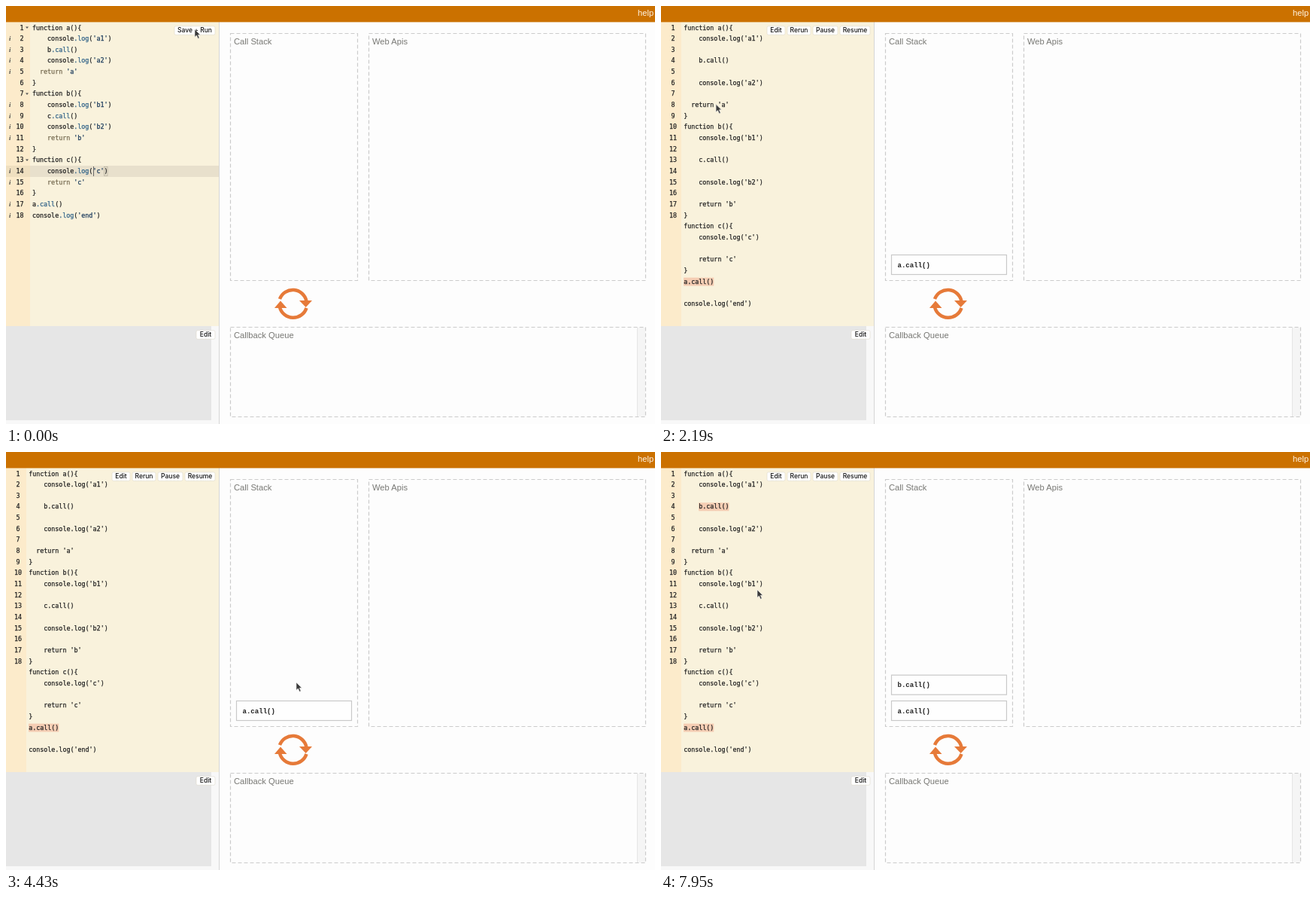
Animation of 863 by 555 pixels, one loop 8000 ms. Source, as an HTML page:

```html
<!DOCTYPE html>
<html lang="en">
<head>
<meta charset="utf-8">
<title>Call stack demo</title>
<style>
html, body { margin: 0; width: 863px; height: 555px; overflow: hidden; background: #fdfdfd; }
svg { display: block; }
text { white-space: pre; }
.code { font: 8.36px "DejaVu Sans Mono", monospace; color: #222; }
.code, .code tspan { fill: currentColor; stroke: currentColor; stroke-width: .25px; }
.label { font: 11.2px "Liberation Sans", Arial, sans-serif; fill: #787874; }
.button { font: 500 8.5px Inter, "Liberation Sans", sans-serif; fill: #111; text-anchor: middle; }
.call { font: bold 9.05px "Liberation Mono", monospace; fill: #222; }
.info { font: italic bold 8.5px "Liberation Serif", serif; fill: #444; }
.member { color: #2f6288; }
.string { color: #1b3b5c; }
.return { color: #756a50; }
</style>
</head>
<body>
<svg id="stage" width="863" height="555" viewBox="0 0 863 555"></svg>
<script>
const LOOP = 8000, ROW = 14.665, CHAR = 5.033;
const source = [
  "function a(){", "    console.log('a1')", "    b.call()", "    console.log('a2')", "  return 'a'", "}",
  "function b(){", "    console.log('b1')", "    c.call()", "    console.log('b2')", "    return 'b'", "}",
  "function c(){", "    console.log('c')", "    return 'c'", "}",
  "a.call()", "console.log('end')"
];

const rect = (x, y, w, h, fill, more = "") =>
  `<rect x="${x}" y="${y}" width="${w}" height="${h}" fill="${fill}" ${more}/>`;
const text = (x, y, value, cls, more = "") =>
  `<text x="${x}" y="${y}" class="${cls}" ${more}>${value}</text>`;
const group = (id, body) => `<g id="${id}">${body}</g>`;
const baseline = row => 31.5 + row * ROW;

function button(x, w, y, label, id = "") {
  return rect(x, y, w, 11.5, "#fff", `rx="2" stroke="#ddd8cc" stroke-width=".6" id="${id}"`) +
    text(x + w / 2, y + 8.5, label, "button");
}

function zone(x, y, w, h, label) {
  return rect(x, y, w, h, "none", 'stroke="#cbcbcb" stroke-width="1.2" stroke-dasharray="5 3"') +
    text(x + 4.5, y + 14.2, label, "label");
}

function mark(row, from, to) {
  return rect(30 + from * CHAR, baseline(row) - 8.2, (to - from) * CHAR, 11, "#f5cdb3");
}

function stackItem(id, level, label) {
  const y = 330.5 - level * 34.3;
  return group(id, rect(306.5, y, 153, 26, "#fefefe", 'stroke="#c9c9c9" stroke-width="1.2"') +
    text(314.5, y + 16, label, "call"));
}

function colour(line) {
  return line.replace(/'\w+'|\.(?:log|call)|return/g, word => {
    const cls = word[0] === "'" ? "string" : word[0] === "." ? "member" : "return";
    return `<tspan class="${cls}">${word}</tspan>`;
  });
}

function editor() {
  const infos = source.map((line, i) =>
    /[.]|return/.test(line) ? text(4, baseline(i), "i", "info") : "").join("");
  const lines = source.map((line, i) => {
    const y = baseline(i);
    const fold = line.startsWith("function") ? `<path d="M26 ${y - 4}h4l-2 2.6z" fill="#555"/>` : "";
    return text(23.5, y, i + 1, "code", 'text-anchor="end"') + fold + text(35, y, colour(line), "code");
  }).join("");
  return rect(0, 21, 32, 404, "#fcebcb") +
    rect(0, 212, 32, 15, "#efdfbf") + rect(32, 212, 251, 15, "#e8e0cc") +
    lines + group("infos", infos) +
    rect(116, 213, 1, 13, "#666") +
    rect(130.5, 213.5, 4.5, 12, "none", 'stroke="#bbb5a2" stroke-width=".8"') +
    button(224, 54, 26.8, "Save + Run", "run");
}

function runner() {
  let row = 0;
  const lines = source.map((line, i) => {
    const out = text(16, baseline(i), i + 1, "code", 'text-anchor="middle"') +
      text(30.2, baseline(row), line, "code");
    row += line.includes(".") ? 2 : 1;
    return out;
  }).join("");
  return rect(0, 21, 27, 404, "#fcebcb") +
    group("markA", mark(23, 0, 8)) +
    group("markA1", mark(1, 4, 21) + mark(3, 0, 12) + mark(5, 0, 21) + mark(7, 0, 2)) +
    group("markB", mark(3, 4, 12)) +
    group("markB1", mark(10, 4, 21) + mark(12, 0, 4)) +
    lines +
    button(141, 24, 26.8, "Edit") + button(168, 31, 26.8, "Rerun") +
    button(202, 33, 26.8, "Pause") + button(238, 40, 26.8, "Resume");
}

const loopIcon = `<g fill="none" stroke="#e67a39" stroke-width="4.5">
  <path d="M364 389A18.5 18.5 0 0 1 399.5 392M399.5 401A18.5 18.5 0 0 1 364 400"/>
  <path d="M390 391h17l-8.3 9zM357 401h16.5l-8.5-9.5z" fill="#e67a39" stroke="none"/></g>`;

document.getElementById("stage").innerHTML =
  rect(0, 0, 863, 555, "#fdfdfd") +
  rect(0, 21, 283, 404, "#f9f2dc") +
  group("editor", editor()) + group("runner", runner()) +
  rect(0, 425, 273, 125, "#e6e6e6") + rect(273, 425, 10, 130, "#f8f8f8") + rect(0, 550, 283, 5, "#f8f8f8") +
  button(253, 25, 430.8, "Edit") +
  rect(283, 21, 1, 534, "#d6d6d6") +
  rect(0, 0, 863, 21.4, "#cb7100") + text(840, 12.6, "help", "label", 'style="fill:#fff4e4"') +
  rect(839, 427, 11, 118, "#f5f5f5") + rect(839, 427, 1, 118, "#e6e6e6") +
  zone(298.5, 36.5, 169, 328, "Call Stack") +
  zone(482.5, 36.5, 368, 328, "Web Apis") +
  zone(298.5, 426.5, 552, 119, "Callback Queue") +
  loopIcon +
  stackItem("callA", 0, "a.call()") + stackItem("callA1", 1, "console.log('a1')") +
  stackItem("callB", 1, "b.call()") + stackItem("callB1", 2, "console.log('b1')") +
  group("arrow", '<path d="M0 0V10.2L2.4 8L4.3 12.2L6.1 11.4L4.3 7.3H7.3Z" fill="#3a3a3a" stroke="#eee" stroke-width=".6"/>') +
  group("beam", '<path d="M-2.5 -5Q0 -5 0 -3.5Q0 -5 2.5 -5M0 -4V4M-2.5 5Q0 5 0 3.5Q0 5 2.5 5" fill="none" stroke="#444"/>');

// Visible spans: id, start, end
const spans = [
  ["editor", 0, 670], ["infos", 0, 520], ["runner", 670, LOOP],
  ["markA", 810, LOOP], ["callA", 1130, LOOP],
  ["markA1", 2450, 3760], ["callA1", 2450, 3760],
  ["markB", 5110, LOOP], ["callB", 5110, LOOP],
  ["markB1", 6410, 7700], ["callB1", 6410, 7700],
  ["beam", 990, 1860]
];

// Pointer path: time, x, y
const path = [
  [0, 251, 31], [520, 251, 31], [1180, 89, 174], [1600, 62, 360], [1780, 58, 350], [1900, 60, 290],
  [2300, 76, 95], [2650, 101, 65], [2880, 101, 65], [3150, 45, 370], [3510, 388, 308], [4430, 386, 306],
  [4940, 374, 318], [5320, 364, 316], [5420, 360, 312], [6570, 360, 312],
  [7100, 108, 186], [7270, 108, 186], [7900, 128, 183], [LOOP, 128, 183]
];

function pointer(t) {
  const i = path.findIndex(p => p[0] > t);
  const [a, b] = [path[i - 1], path[i]];
  const k = (t - a[0]) / (b[0] - a[0]), ease = k * k * (3 - 2 * k);
  return [a[1] + (b[1] - a[1]) * ease, a[2] + (b[2] - a[2]) * ease];
}

const el = id => document.getElementById(id);
const show = (id, on) => el(id).setAttribute("visibility", on ? "inherit" : "hidden");

function draw(now) {
  const t = now % LOOP;
  for (const [id, start, end] of spans) show(id, t >= start && t < end);
  show("arrow", t < 990 || t >= 1860);
  el("run").setAttribute("fill", t < 520 ? "#fff" : "#e4e4e4");
  const move = `translate(${pointer(t)})`;
  el("arrow").setAttribute("transform", move);
  el("beam").setAttribute("transform", move);
  requestAnimationFrame(() => draw(performance.now()));
}
draw(performance.now());
</script>
</body>
</html>
```
